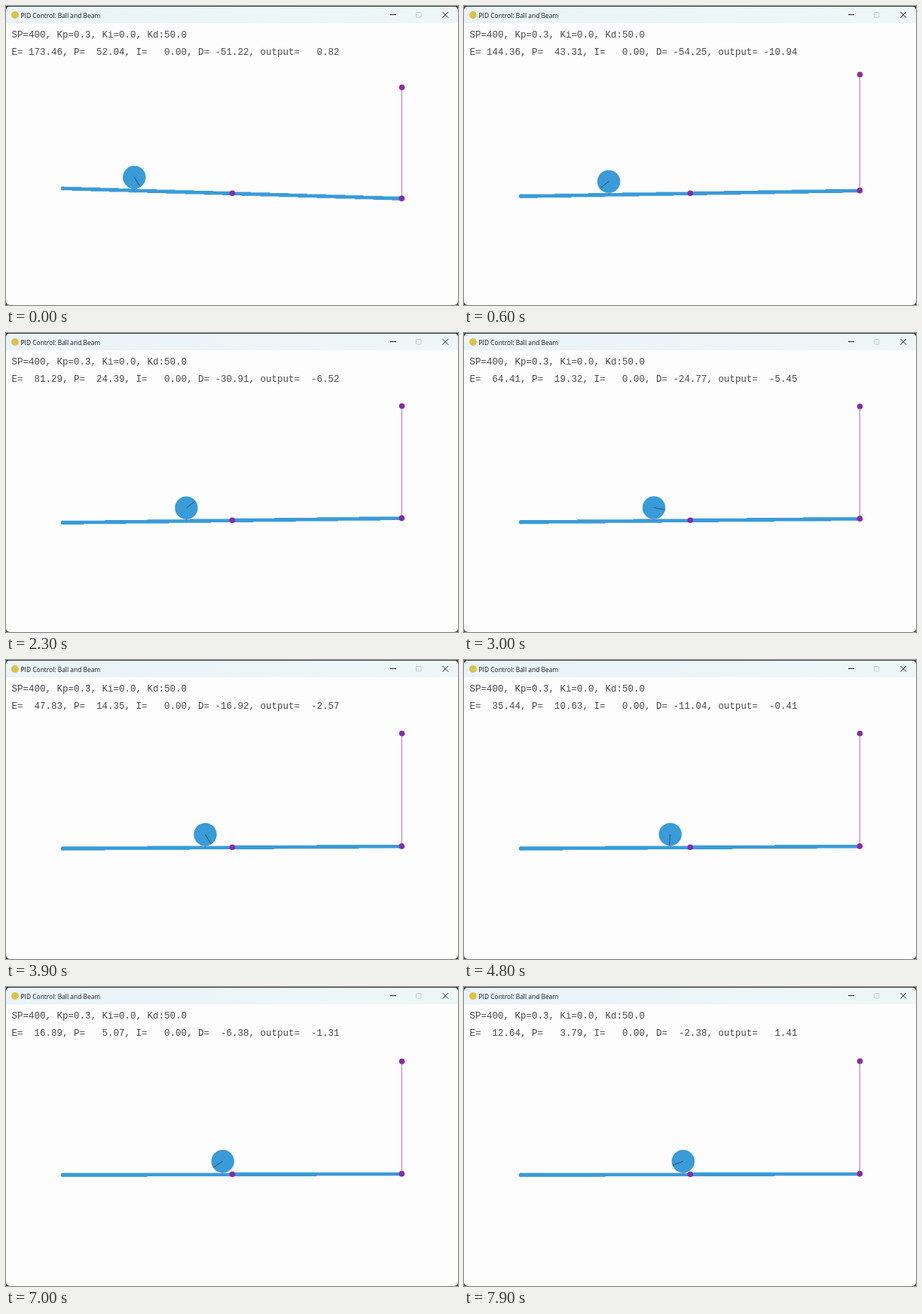
Write an HTML page that moves like this. It is 600x398 px and loops after 8 s.

```html
<!DOCTYPE html>
<html lang="en">
<head>
<meta charset="utf-8">
<title>PID Control: Ball and Beam</title>
<style>
  html, body { margin: 0; width: 100%; height: 100%; overflow: hidden; background: #3c4146; }
  svg { display: block; }
  .title { font: 8.43px "Open Sans", "Noto Sans", sans-serif; fill: #15191c; }
  .info { font: 12.5px "Liberation Mono", monospace; fill: #484848; white-space: pre; }
  .blue { fill: #399bd8; }
  .purple { fill: #8a2ba6; }
  .thin { stroke-width: .75; }
</style>
</head>
<body>
<svg width="600" height="398" viewBox="0 0 600 398">
  <defs>
    <clipPath id="window"><rect y="1" width="600" height="397" rx="5"/></clipPath>
    <linearGradient id="bar">
      <stop offset="0" stop-color="#e9f3f9"/>
      <stop offset="1" stop-color="#eef7f7"/>
    </linearGradient>
  </defs>
  <g clip-path="url(#window)">
    <rect width="600" height="398" fill="#fefdfe"/>
    <rect width="600" height="23" fill="url(#bar)"/>
  </g>
  <circle cx="12" cy="12" r="5" fill="#dcc348"/>
  <text class="title" x="19.5" y="15.6">PID Control: Ball and Beam</text>
  <g fill="none" stroke="#1b1b1b">
    <path d="M510 11.5h8"/>
    <rect x="544.5" y="8.5" width="6.5" height="6.5" rx="1" stroke="#c3cbd0"/>
    <path d="M579.5 8l7.5 7.5M587 8l-7.5 7.5"/>
  </g>
  <text class="info" x="7.5" y="42">SP=400, Kp=0.3, Ki=0.0, Kd:50.0</text>
  <text class="info" id="readout" x="7.5" y="64.5"></text>

  <path id="beam" class="blue" transform="scale(.75)"/>
  <!-- Offset by half a simulation pixel -->
  <g transform="translate(.375 .375)">
    <g class="blue">
      <circle id="capL" cx="75" r="2.6"/>
      <circle id="capR" cx="525" r="2.6"/>
    </g>
    <g id="ball">
      <circle class="blue" r="15.2"/>
      <path class="thin" d="M0 14.6v3" stroke="#a0505c"/>
      <path id="spoke" class="thin" d="M0 0H15" stroke="#2c3e50"/>
    </g>
    <line id="rod" class="thin" x1="525" x2="525" stroke="#8e44ad"/>
    <g class="purple">
      <circle cx="300" cy="248.8" r="3.8"/>
      <circle id="motor" cx="525.2" r="3.8"/>
      <circle id="joint" cx="525" r="3.8"/>
    </g>
  </g>
</svg>
<script>
const LOOP = 8000, STEP = 100, SCALE = 0.75;
const SETPOINT = 400, KP = 0.3, PIVOT_Y = 332, HALF = 300, THICK = 3.25;
const START_X = 169.9, START_ANGLE = 58.4, RADIUS = 15;

const times = [0, 600, 1600, 3000, 4800, 6100, 7900];
const logError = [173.46, 144.36, 102.75, 64.41, 35.44, 22.67, 12.64].map(Math.log);
const damping = [-51.22, -54.25, -38.47, -24.77, -11.04, -9.70, -2.38];
const tilt = [9.3, -4.7, -5.2, -3, -2, -1.5, -1];
const motorY = [107.8, 90.8, 95.3, 97.4, 97.4, 98.8, 98.3];

const el = id => document.getElementById(id);
const set = (id, attrs) => {
  for (const name in attrs) el(id).setAttribute(name, attrs[name]);
};
const num = v => v.toFixed(2).padStart(7);

// Smooth curve through the values, flat at local extremes
function curve(values, t) {
  const last = times.length - 2;
  let i = 0;
  while (i < last && t >= times[i + 1]) i++;
  const secant = k => (values[k + 1] - values[k]) / (times[k + 1] - times[k]);
  const slope = k => {
    if (k === 0) return secant(0);
    if (k > last) return secant(last);
    const a = secant(k - 1), b = secant(k);
    return a * b <= 0 ? 0 : (a + b) / 2;
  };
  const h = times[i + 1] - times[i], u = (t - times[i]) / h, w = 1 - u;
  return values[i] * w * w * (1 + 2 * u) + values[i + 1] * u * u * (3 - 2 * u)
    + h * u * w * (slope(i) * w - slope(i + 1) * u);
}

// Beam outline on whole simulation pixels; its two edges step half a period apart
function beamPath(left, right) {
  const top = [], bottom = [];
  for (let x = 0; x < 2 * HALF; x++) {
    const y = left + (right - left) * (x + 0.5) / (2 * HALF);
    const a = Math.ceil(y) - 3, b = Math.round(y) + 4;
    top.push(`${x + 100} ${a}`, `${x + 101} ${a}`);
    bottom.push(`${x + 100} ${b}`, `${x + 101} ${b}`);
  }
  return `M${top.concat(bottom.reverse()).join("L")}Z`;
}

function draw(t) {
  const error = Math.exp(curve(logError, t));
  const p = KP * error, d = curve(damping, t);
  el("readout").textContent =
    `E=${num(error)}, P=${num(p)}, I=${num(0)}, D=${num(d)}, output=${num(p + d)}`;

  const lift = curve(tilt, t);
  const left = Math.round(PIVOT_Y - lift), right = Math.round(PIVOT_Y + lift);
  const endY = right * SCALE, top = curve(motorY, t);
  set("beam", { d: beamPath(left, right) });
  set("capL", { cy: left * SCALE });
  set("capR", { cy: endY });
  set("joint", { cy: endY });
  set("motor", { cy: top });
  set("rod", { y1: top, y2: endY });

  const x = (SETPOINT - error) * SCALE;
  const y = (PIVOT_Y + lift * (x / SCALE - SETPOINT) / HALF - THICK) * SCALE - RADIUS;
  const angle = START_ANGLE + (x - START_X) / RADIUS * 180 / Math.PI;
  set("ball", { transform: `translate(${x} ${y})` });
  set("spoke", { transform: `rotate(${angle})` });
}

const start = performance.now();
function tick() {
  const t = Math.max(0, performance.now() - start) % LOOP;
  draw(Math.floor(t / STEP) * STEP);
  requestAnimationFrame(tick);
}
tick();
</script>
</body>
</html>
```
